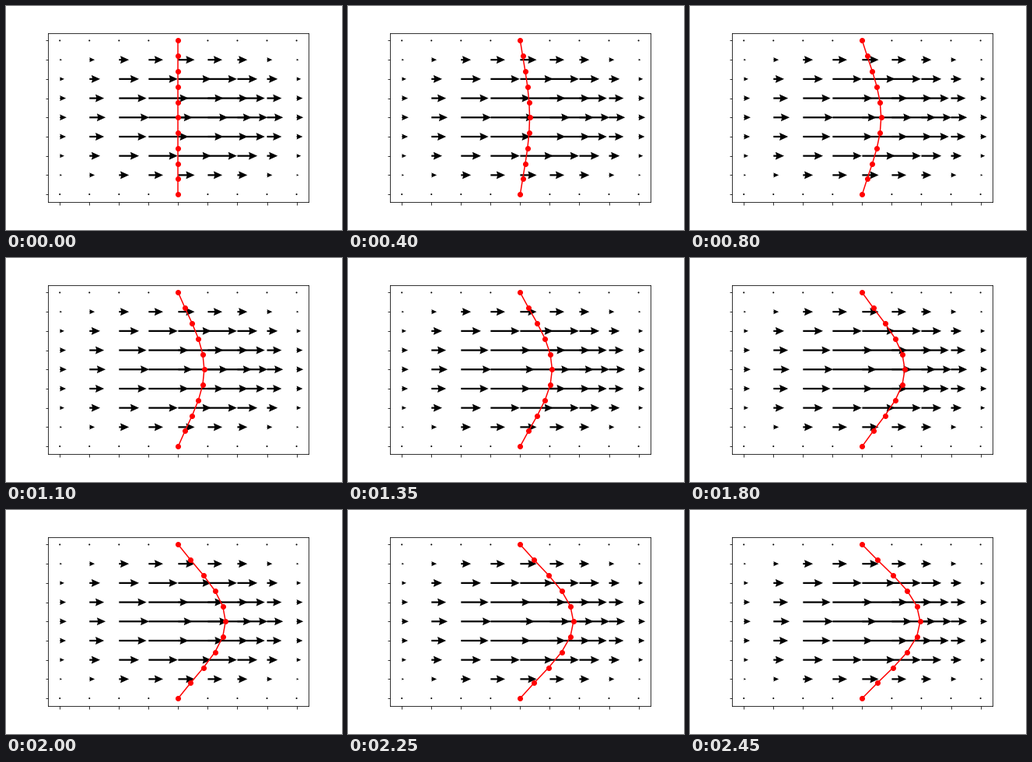
A matplotlib script for the animation above (2500 ms loop, 432 px wide and 288 px high).

```python
import numpy as np
import matplotlib.pyplot as plt
from matplotlib.animation import FuncAnimation

FRAMES = 50
INTERVAL = 50
STEP = 0.02  # time advanced per frame


def speed(x, y):
    return (1 - y**2) * np.exp(-(x**2 + y**2) / 2)


fig, ax = plt.subplots(figsize=(6, 4), dpi=72, facecolor="white")
fig.subplots_adjust(left=0.125, right=0.9, bottom=0.125, top=0.88)

# Horizontal velocity field
x, y = np.meshgrid(np.linspace(-2, 2, 9), np.linspace(-1, 1, 9))
u = speed(x, y)
ax.quiver(x, y, u, np.zeros_like(u), headwidth=4.5)
ax.set_xlim(-2.2, 2.2)
ax.set_ylim(-1.1, 1.1)
ax.set_xticks(np.linspace(-2, 2, 9))
ax.set_yticks(np.linspace(-1, 1, 9))
ax.tick_params(labelbottom=False, labelleft=False)

# Material line carried by the flow
y_line = np.linspace(-1, 1, 11)
u_line = speed(0, y_line)
line, = ax.plot(np.zeros_like(y_line), y_line, "ro-")


def update(i):
    line.set_xdata(u_line * STEP * i)
    return line,


anim = FuncAnimation(fig, update, frames=FRAMES, interval=INTERVAL,
                     init_func=lambda: update(0), repeat=True, repeat_delay=0)
plt.show()
```
